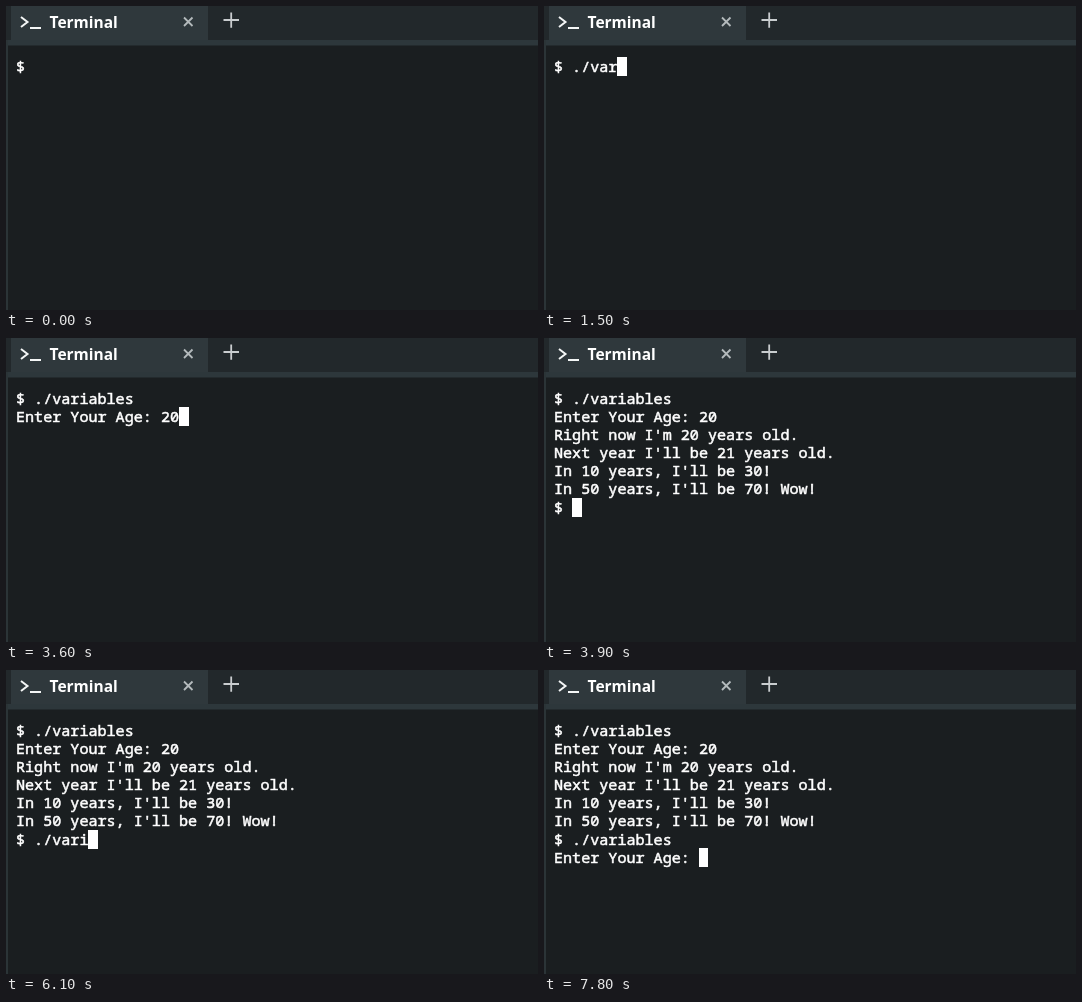
These frames come from a looping animation (532x304 px, 8 s). An HTML page:

```html
<!DOCTYPE html>
<html lang="en">
<head>
<meta charset="utf-8">
<title>Terminal</title>
<style>
  html, body { margin: 0; width: 100%; height: 100%; overflow: hidden; background: #1a1e20; }
  #stage { position: relative; width: 532px; height: 304px; overflow: hidden; }
  svg { position: absolute; left: 0; top: 0; }
  .title { font: 700 15.5px "Noto Sans", "Open Sans", sans-serif; fill: #fff; }
  #screen {
    position: absolute; left: 10px; top: 50.6px; margin: 0;
    font: 400 15.1px/18.15px "Noto Sans Mono", "DejaVu Sans Mono", monospace;
    color: #fff; white-space: pre; -webkit-text-stroke: 0.55px #fff;
  }
  #cursor { position: absolute; width: 9.6px; height: 18.6px; margin-top: 0.5px; background: #fff; }
</style>
</head>
<body>
<div id="stage">
  <svg width="532" height="304" fill="none">
    <rect width="532" height="35" fill="#22282b"/>
    <path d="M5 0H202V35H5Z" fill="#2f383c"/>
    <path d="M0 34H532V39.5H0Z" fill="#2d373b"/>
    <path d="M0 34H2V304H0Z" fill="#2b3437"/>
    <path d="M15 11L21.5 16L15 21M24 22H35" stroke="#f4f6f6" stroke-width="2"/>
    <text class="title" x="43.5" y="21.5">Terminal</text>
    <path d="M178 11.5L186.5 20M186.5 11.5L178 20" stroke="#b4babc" stroke-width="1.8"/>
    <path d="M217.5 14H233M225.2 6.5V21.7" stroke="#c9cdcf" stroke-width="1.8"/>
  </svg>
  <div id="screen"><span id="text"></span><div id="cursor"></div></div>
</div>
<script>
const LOOP = 8000, BLINK = 600, LINE_HEIGHT = 18.15;
const question = "Enter Your Age: ";
const answer = `
Right now I'm 20 years old.
Next year I'll be 21 years old.
In 10 years, I'll be 30!
In 50 years, I'll be 70! Wow!
$ `;

// [time in ms, text added]; key presses restart the cursor blink
const keys = [
  [-BLINK, "$ "],
  [400, "."], [600, "/"], [700, "v"],
  [1400, "a"], [1500, "r"], [1600, "i"], [1700, "a"],
  [1900, "bl"], [2100, "es"], [2300, "\n"],
  [3500, "2"], [3600, "0"], [3900, answer],
  [5200, "."], [5300, "/"], [5500, "v"], [5700, "a"],
  [6100, "ri"], [6300, "a"],
  [6500, "b"], [6600, "l"], [6700, "e"], [6800, "s"],
  [7800, "\n" + question],
];
const output = [[2400, question]];
const events = [...keys, ...output].sort((a, b) => a[0] - b[0]);

const textNode = document.getElementById("text");
const cursor = document.getElementById("cursor");

function draw(now) {
  const time = now % LOOP;
  const text = events.filter(([at]) => at <= time).map(([, added]) => added).join("");
  const lines = text.split("\n");
  const lastKey = keys.filter(([at]) => at <= time).pop()[0];
  const lit = Math.floor((time - lastKey) / BLINK) % 2 === 0;

  if (textNode.textContent !== text) textNode.textContent = text;
  cursor.style.left = lines[lines.length - 1].length + "ch";
  cursor.style.top = (lines.length - 1) * LINE_HEIGHT + "px";
  cursor.style.visibility = lit ? "visible" : "hidden";
}

let start;
function tick(now) {
  start ??= now;
  draw(now - start);
  requestAnimationFrame(tick);
}
draw(0);
requestAnimationFrame(tick);
</script>
</body>
</html>
```
